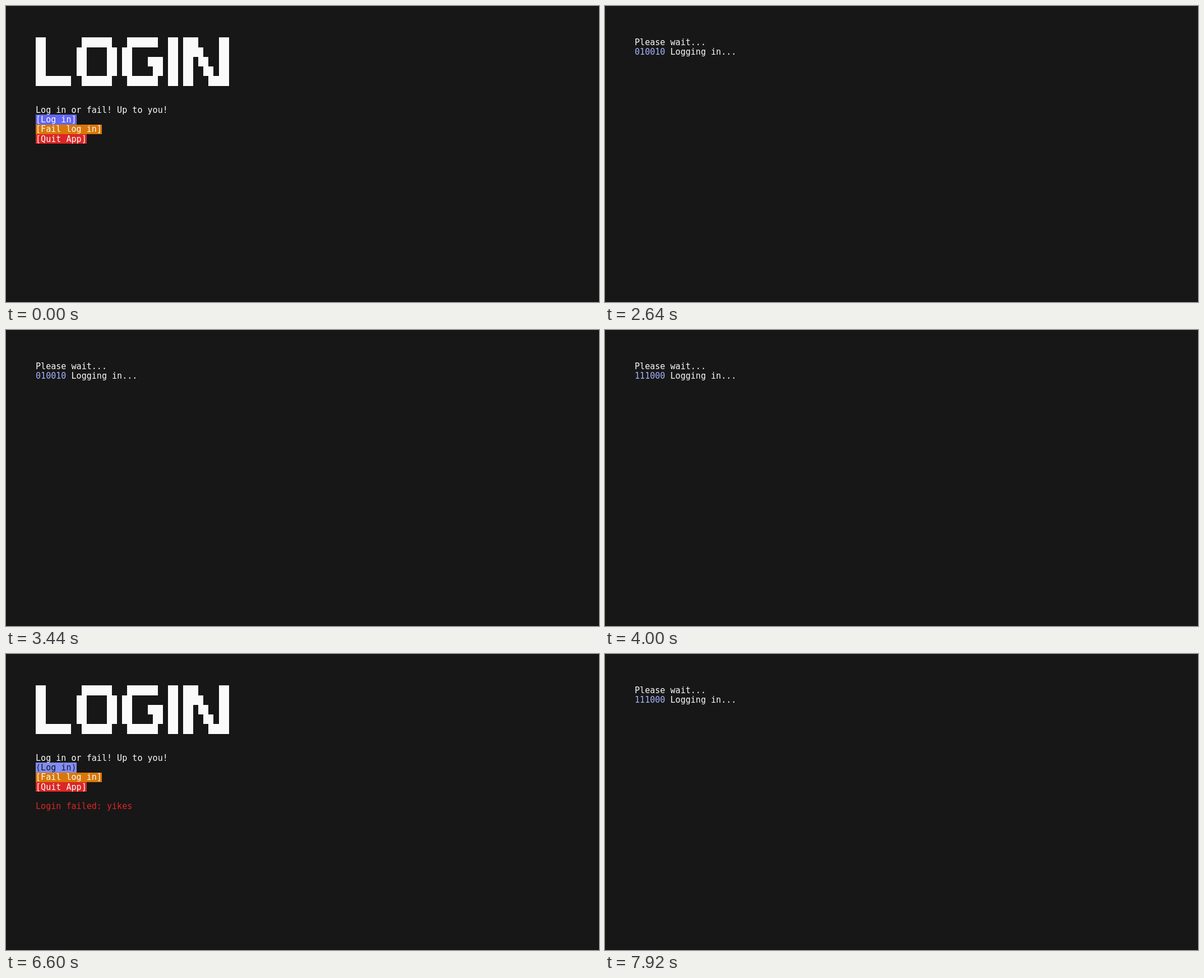
These frames come from a looping animation (1058 px wide and 529 px high, 8000 ms). An HTML page with a canvas:

```html
<!DOCTYPE html>
<html lang="en">
<head>
<meta charset="utf-8">
<title>Login</title>
<style>
  html, body { margin: 0; width: 100%; height: 100%; overflow: hidden; background: #171717; }
  canvas { display: block; }
</style>
</head>
<body>
<canvas id="stage" width="1058" height="529"></canvas>
<script>
const ctx = document.getElementById('stage').getContext('2d');
const LOOP = 8000, TICK = 80;
const BG = '#171717', WHITE = '#fafafa', RED = '#dc2626';

// Terminal grid: cell size and origin
const CW = 9.07, CH = 17.25, X0 = 53, Y0 = 56.3;
const colX = c => Math.round(X0 + c * CW);
const rowY = r => Math.round(Y0 + r * CH);

const BANNER = [
  '##       ######   ######  ## ###    ##',
  '##      ##    ## ##       ## ####   ##',
  '##      ##    ## ##   ### ## ## ##  ##',
  '##      ##    ## ##    ## ## ##  ## ##',
  '#######  ######   ######  ## ##   ####'
];
const BUTTONS = [
  { label: 'Log in', color: '#6366f1', focus: '#818cf8' },
  { label: 'Fail log in', color: '#d97706', focus: '#fbbf24' },
  { label: 'Quit App', color: RED, focus: '#f87171' }
];
const SPINNER = ['010010', '001100', '100101', '111010', '111101',
                 '010111', '101011', '111000', '110011', '110101'];

function cells(col, row, count, color) {
  ctx.fillStyle = color;
  ctx.fillRect(colX(col), rowY(row), colX(col + count) - colX(col), rowY(row + 1) - rowY(row));
}

function print(text, col, row, color) {
  ctx.fillStyle = color;
  [...text].forEach((ch, i) => ctx.fillText(ch, X0 + (col + i) * CW, Y0 + row * CH + 13.8));
}

function drawMenu(focused, failed) {
  BANNER.forEach((line, row) => {
    for (const run of line.matchAll(/#+/g)) cells(run.index, row, run[0].length, WHITE);
  });
  print('Log in or fail! Up to you!', 0, 7, WHITE);
  BUTTONS.forEach(({ label, color, focus }, i) => {
    const on = i === focused;
    cells(0, 8 + i, label.length + 2, on ? focus : color);
    print(on ? `⟨${label}⟩` : `[${label}]`, 0, 8 + i, on ? BG : WHITE);
  });
  if (failed) print('Login failed: yikes', 0, 12, RED);
}

function drawWait(elapsed) {
  print('Please wait...', 0, 0, WHITE);
  print(SPINNER[Math.floor(elapsed / TICK) % SPINNER.length], 0, 1, '#a5b4fc');
  print('Logging in...', 7, 1, WHITE);
}

function draw(t) {
  ctx.fillStyle = BG;
  ctx.fillRect(0, 0, 1058, 529);
  ctx.font = '15.06px "DejaVu Sans Mono", monospace';
  if (t < 760) drawMenu(-1, false);
  else if (t < 920) drawMenu(0, false);
  else if (t < 2640) drawMenu(1, false);
  else if (t < 4240) drawWait(t - 2640);
  else if (t < 6600) drawMenu(1, true);
  else if (t < 7360) drawMenu(0, true);
  else drawWait(t - 7360);
}

const start = performance.now();
function frame() {
  draw((performance.now() - start) % LOOP);
  requestAnimationFrame(frame);
}
frame();
</script>
</body>
</html>
```
